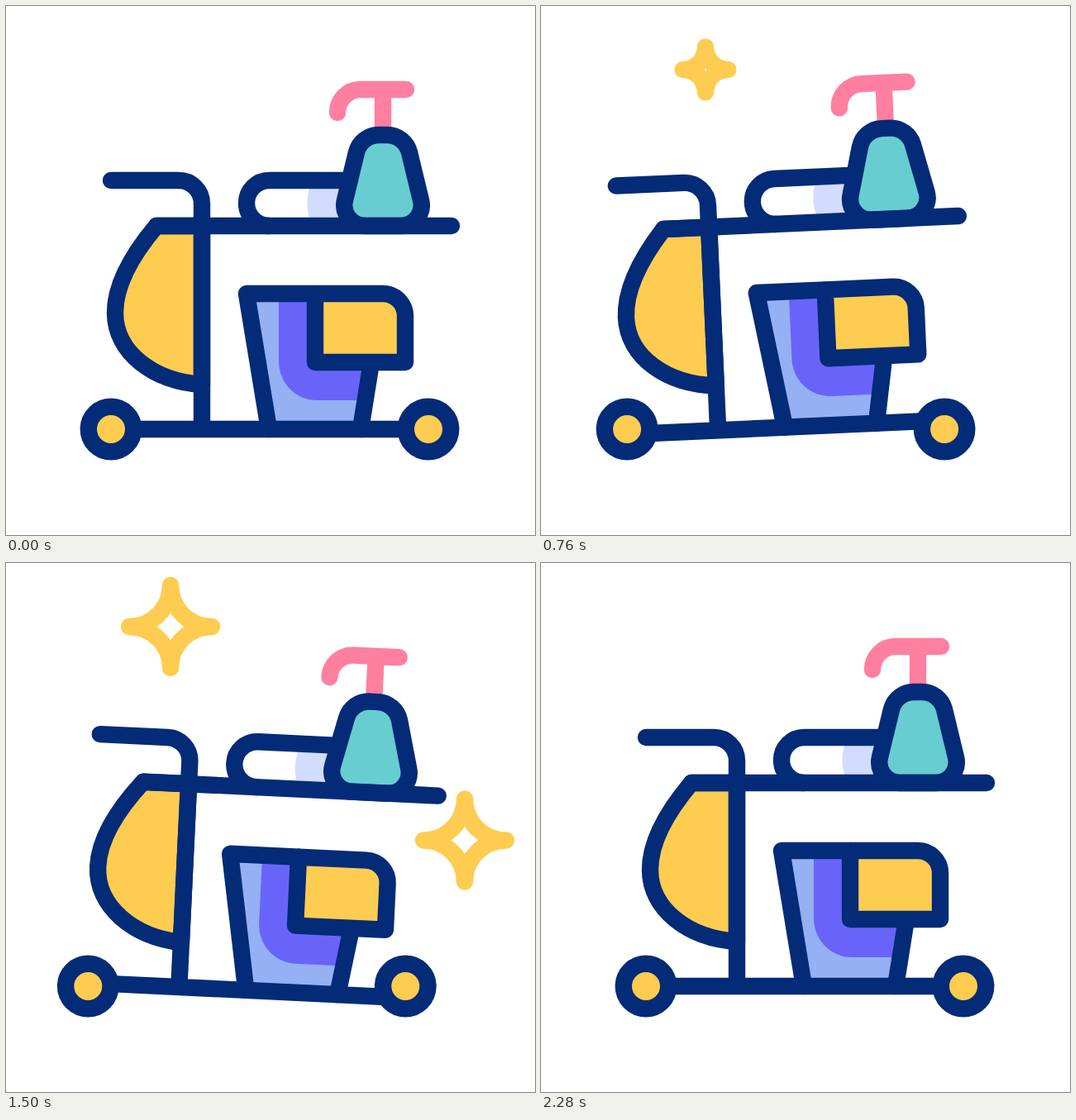
Animation of 640x640 px, one loop 2.4 s. Source, as an HTML page:

```html
<!DOCTYPE html>
<html lang="en">
<head>
<meta charset="utf-8">
<title>Cleaning cart</title>
<style>
  html, body { margin: 0; width: 100%; height: 100%; overflow: hidden; background: #fff; }
  svg { display: block; width: 100vw; height: 100vh; }
  .line { fill: none; stroke: #032b77; stroke-width: 20.4; stroke-linecap: round; stroke-linejoin: round; }
  .yellow { fill: #fecc50; }
  .teal { fill: #68cdd1; }
  .pump { stroke: #ff7fa1; }
  .star { stroke: #fecc50; }
</style>
</head>
<body>
<svg viewBox="0 0 640 640">
  <g id="body">
    <!-- bin -->
    <path fill="#95b0f3" d="M291 348 L318 512 H429 L456 348Z"/>
    <path fill="#6964f9" d="M330 348 V430 A46 47 0 0 0 376 477 H435 L456 348Z"/>
    <path class="line" d="M318 512 L291 348 H374 M429 512 L442 431"/>
    <path class="line yellow" d="M374 348 H456 A27 27 0 0 1 483 375 V431 H374Z"/>
    <!-- bag, handle and frame -->
    <path class="line yellow" d="M237 266 H182 C150 304 132 340 132 371 C132 419 178 454 237 458Z"/>
    <path class="line" d="M127 211 H209 A28 28 0 0 1 237 239 V512 M150 512 H488"/>
    <!-- towel -->
    <path fill="#d2dcfd" d="M367 221 Q362 238 367 256 H420 V221Z"/>
    <path class="line" d="M410 211 H318.5 A27.5 27.5 0 0 0 318.5 266"/>
    <!-- bottle and shelf -->
    <path class="line pump" d="M401 129 A28 28 0 0 1 429 101 H484 M456 101 V146"/>
    <path class="line teal" d="M434 266 A25 25 0 0 1 410 235 L424 177 A28 28 0 0 1 451 156 H461 A28 28 0 0 1 488 177 L502 235 A25 25 0 0 1 478 266Z"/>
    <path class="line" d="M182 266 H539"/>
  </g>
  <g id="wheels">
    <circle class="line yellow" cx="127" cy="512" r="27.2"/>
    <circle class="line yellow" cx="511" cy="512" r="27.2"/>
  </g>
  <path id="star1" class="line star" transform="translate(199 77)"/>
  <path id="star2" class="line star" transform="translate(555 335.5)"/>
</svg>
<script>
  const LOOP = 2400;
  const $ = id => document.getElementById(id);

  // Smooth step from 0 to 1, constant outside that range.
  const ease = p => (1 - Math.cos(Math.PI * Math.min(1, Math.max(0, p)))) / 2;

  // Starts at rest and eases to each stop in turn; turns[0] is the start time.
  const glide = (t, turns, stops) => stops.reduce((sum, stop, i) =>
    sum + (stop - (stops[i - 1] || 0)) * ease((t - turns[i]) / (turns[i + 1] - turns[i])), 0);

  // Swings to alternating sides by the same amount, then comes to rest.
  const swing = (t, peak, turns) => glide(t, turns,
    turns.slice(1).map((_, i) => i === turns.length - 2 ? 0 : peak * (-1) ** i));

  const rollTurns = [0, 1, 2, 3, 4].map(i => 30 + 535 * i);
  const roll = t => glide(t, rollTurns, [-46, 32, -38, 0]);
  const bounce = t => swing(t, 10, [0, 400, 1027, 1380, 1740, 2280]);
  const tilt = t => swing(t, -2.8, [0, 640, 1570, 2100]);

  // Pops up past its resting size, and plays the same move backwards to vanish.
  function starSize(t) {
    const u = Math.min(t - 655, 2010 - t);
    return 68 * ease(u / 242) - 18 * ease((u - 242) / 220);
  }

  function drawStar(id, t) {
    const r = starSize(t);
    const arc = `A${r} ${r} 0 0 0 `;
    $(id).setAttribute('d', r > 0.1
      ? `M0 ${-r}${arc}${r} 0${arc}0 ${r}${arc}${-r} 0${arc}0 ${-r}Z` : '');
  }

  function draw(now) {
    const t = now % LOOP;
    const x = roll(t);
    $('wheels').setAttribute('transform', `translate(${x} 0)`);
    $('body').setAttribute('transform',
      `translate(${x} ${bounce(t)}) rotate(${tilt(t)} 319 512)`);
    drawStar('star1', t);
    drawStar('star2', t - 270);
    requestAnimationFrame(draw);
  }
  draw(0);
</script>
</body>
</html>
```
